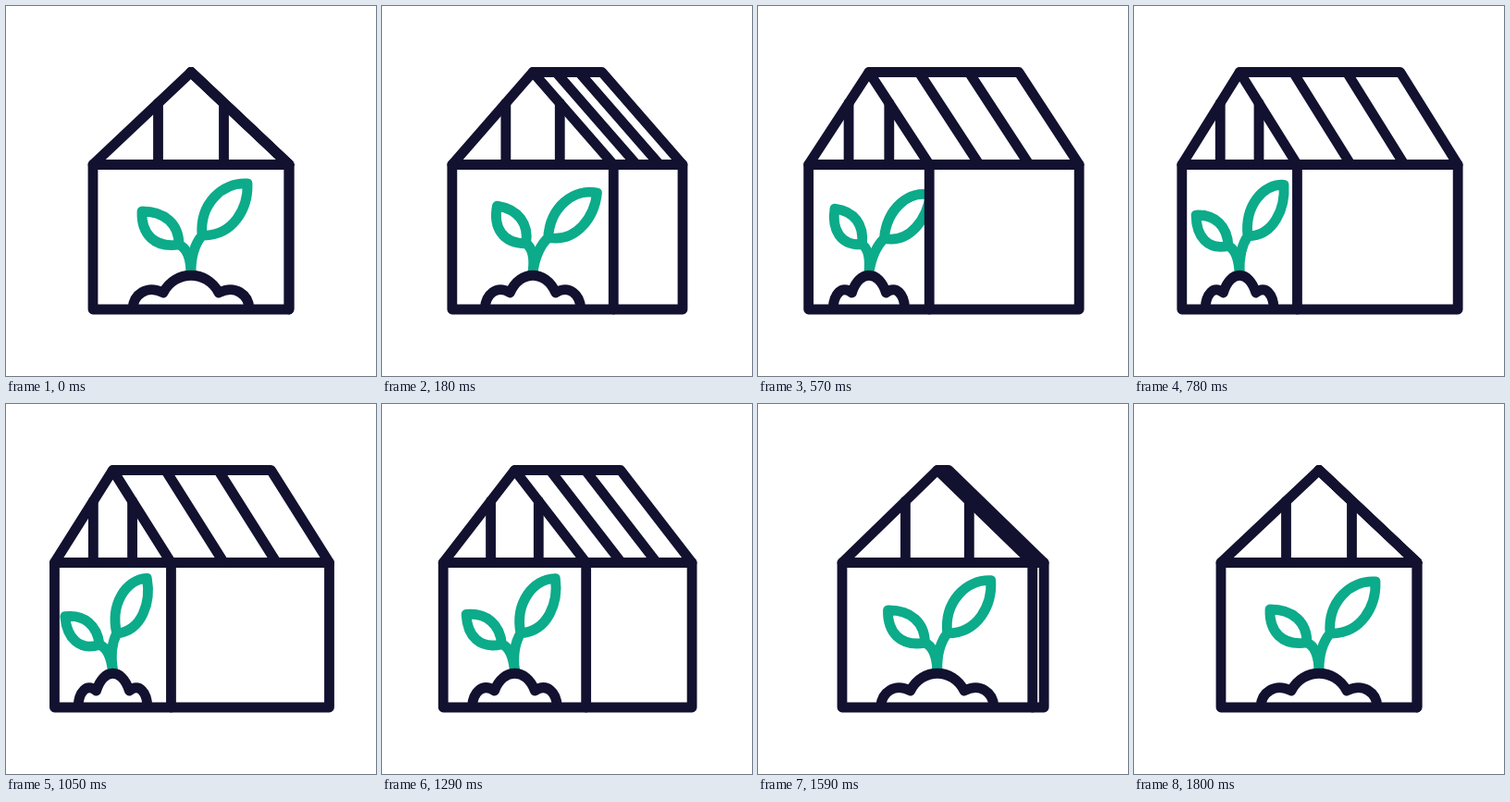
Write an HTML page with a canvas that moves like this. It is 400 px wide and 400 px high and loops after 1830 ms.

```html
<!DOCTYPE html>
<html lang="en">
<head>
<meta charset="utf-8">
<title>Greenhouse</title>
<style>
  html, body { margin: 0; width: 100%; height: 100%; overflow: hidden; background: #fff; }
  canvas { display: block; }
</style>
</head>
<body>
<canvas width="400" height="400"></canvas>
<script>
const ctx = document.querySelector('canvas').getContext('2d');
const LOOP = 1830, STEP = 30;
const NAVY = '#12112f', GREEN = '#0cab8a';
const TOP = 71.5, EAVE = 171.5, FLOOR = 328, SOIL_TOP = 288;

const LEFT_LEAF = new Path2D(
  'M187 258C160 262 146 246 147 222C172 222 187 236 187 258Q199 263 200 288');
const RIGHT_LEAF = new Path2D(
  'M212 248C209 214 234 190 261 192C262 218 246 249 212 248Q200 262 200 288');
const SOIL = new Path2D(
  'M137 327C138 312 152 301 170 310C183 285 217 285 230 310C248 301 262 312 263 327');

const clamp = x => Math.min(1, Math.max(0, x));
const mix = (a, b, k) => a + (b - a) * k;

// Cubic Bezier easing with flat ends; x1 and x2 are the handle positions
function ease(x1, x2, t) {
  t = clamp(t);
  let lo = 0, hi = 1, s;
  for (let i = 0; i < 24; i++) {
    s = (lo + hi) / 2;
    const r = 1 - s;
    if (3 * r * r * s * x1 + 3 * r * s * s * x2 + s * s * s < t) lo = s; else hi = s;
  }
  return s * s * (3 - 2 * s);
}

const sine = (a, b, t) => mix(a, b, 0.5 - 0.5 * Math.cos(Math.PI * clamp(t)));

// How far the house has turned: 0 is front on, 1 is fully turned
const turnAt = t => ease(0.22, 0, t / 1000) * (1 - ease(0.58, 0.41, (t - 900) / 900));

// Lean of the sprout in degrees
function swayAt(t) {
  if (t < 300) return sine(0, 13.5, t / 300);
  if (t < 990) return sine(13.5, -7, (t - 300) / 690);
  return sine(-7, 0, (t - 990) / 780);
}

function line(...pts) {
  ctx.beginPath();
  for (let i = 0; i < pts.length; i += 2) ctx.lineTo(pts[i], pts[i + 1]);
  ctx.stroke();
}

// Strokes a path moved by a matrix while keeping an even line width
function strokeMoved(path, matrix, color, fill) {
  const moved = new Path2D();
  moved.addPath(path, matrix);
  if (fill) {
    ctx.fillStyle = fill;
    ctx.fill(moved);
  }
  ctx.strokeStyle = color;
  ctx.stroke(moved);
}

function drawLeaf(path, x, turn, angle) {
  const matrix = new DOMMatrix()
    .translate(x, SOIL_TOP).rotate(angle)
    .scale(1 - 0.17 * turn, 1 - 0.03 * turn)
    .translate(-200, -SOIL_TOP);
  strokeMoved(path, matrix, GREEN);
}

function draw(t) {
  const p = turnAt(t);
  const left = 94 - 43 * p, corner = 306 - 132 * p, right = 306 + 45 * p;
  const mid = (left + corner) / 2, half = (corner - left) / 2;
  const ridgeEnd = right - half, scale = half / 106;

  ctx.fillStyle = '#fff';
  ctx.fillRect(0, 0, 400, 400);
  ctx.lineWidth = 10.8;
  ctx.lineCap = ctx.lineJoin = 'round';

  // The sprout stays behind the corner wall; its larger leaf lags and leans more
  ctx.save();
  ctx.beginPath();
  ctx.rect(0, 0, corner, 400);
  ctx.clip();
  drawLeaf(LEFT_LEAF, mid, p, swayAt(t));
  drawLeaf(RIGHT_LEAF, mid, p, 1.2 * swayAt(t - 30));
  ctx.restore();
  strokeMoved(SOIL, new DOMMatrix().translate(mid, 0).scale(scale, 1).translate(-200, 0), NAVY, '#fff');

  // Walls
  ctx.strokeStyle = NAVY;
  line(left, EAVE, right, EAVE, right, FLOOR, left, FLOOR, left, EAVE);
  line(corner, EAVE, corner, FLOOR);

  // Gable and its posts
  line(left, EAVE, mid, TOP, corner, EAVE);
  const postTop = mix(TOP, EAVE, 35.5 / 106);
  for (const side of [-1, 1]) {
    const x = mid + side * 35.5 * scale;
    line(x, postTop, x, EAVE);
  }

  // Ridge and rafters
  line(mid, TOP, ridgeEnd, TOP, right, EAVE);
  for (const k of [1 / 3, 2 / 3])
    line(mix(mid, ridgeEnd, k), TOP, mix(corner, right, k), EAVE);
}

const start = performance.now();
function frame() {
  const t = (performance.now() - start) % LOOP;
  draw(Math.floor(t / STEP) * STEP);
  requestAnimationFrame(frame);
}
frame();
</script>
</body>
</html>
```
